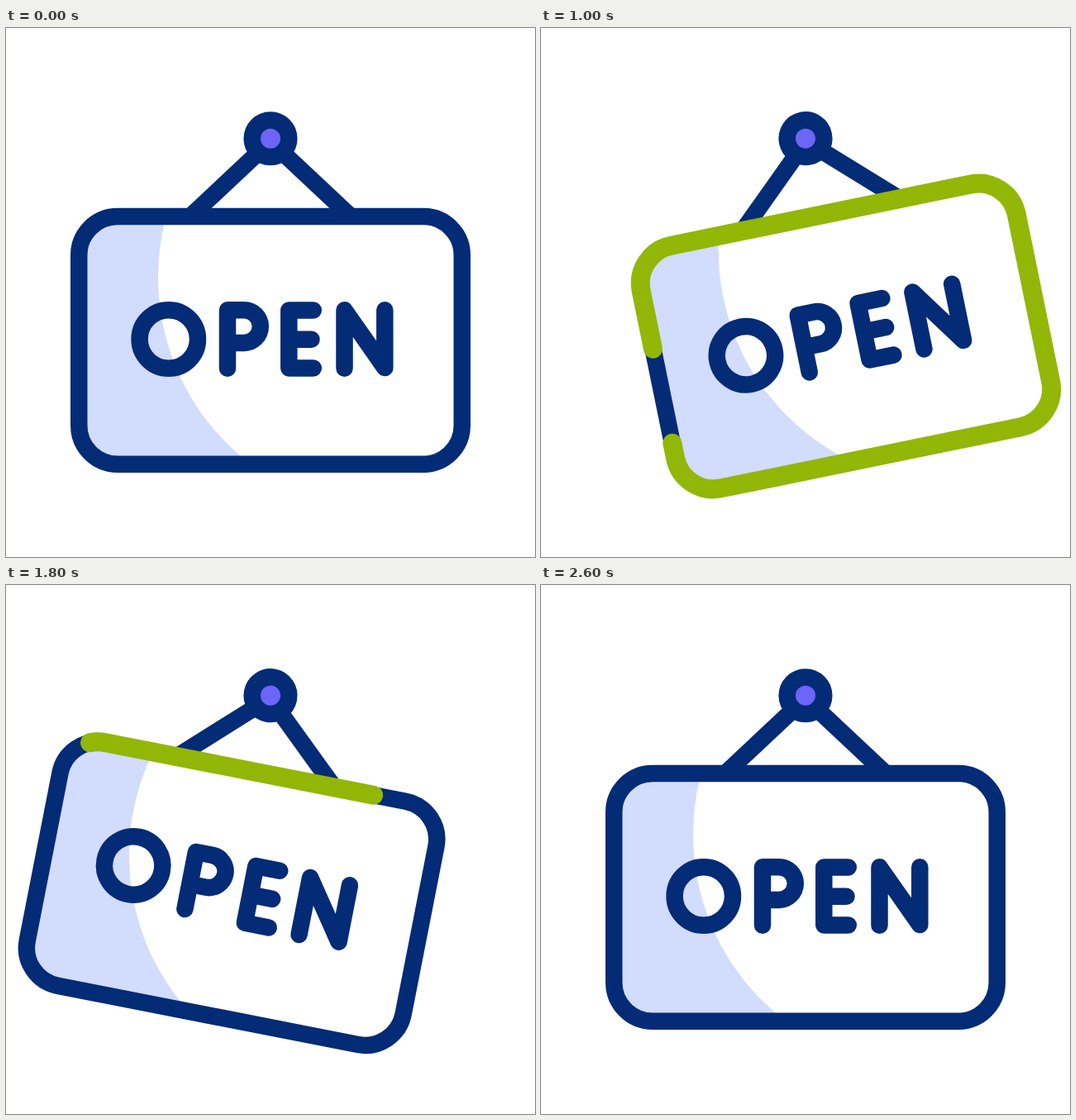
These frames come from a looping animation (640x640 px, 3000 ms). An HTML page:

```html
<!DOCTYPE html>
<html lang="en">
<head>
<meta charset="utf-8">
<title>Open sign</title>
<style>
  html, body { margin: 0; width: 100%; height: 100%; overflow: hidden; background: #fff; }
  svg { display: block; width: 100%; height: 100%; }
  .line { fill: none; stroke: #042b76; stroke-width: 20.5; stroke-linecap: round; stroke-linejoin: round; }
  #glow { stroke: #92b707; stroke-width: 23; }
</style>
</head>
<body>
<svg viewBox="0 0 640 640" role="img" aria-label="Open">
  <defs>
    <path id="board" pathLength="1446" d="M135 228H505A46.75 46.75 0 0 1 551.75 274.75V481A46.75 46.75 0 0 1 505 527.75H135A46.75 46.75 0 0 1 88.25 481V274.75A46.75 46.75 0 0 1 135 228Z"/>
    <clipPath id="inside"><use href="#board"/></clipPath>
  </defs>
  <g id="sign">
    <path class="line" d="M304 152L223.5 227.5M336 152L416.5 227.5"/>
    <g clip-path="url(#inside)">
      <rect x="88" y="228" width="464" height="300" fill="#d2dcfd"/>
      <circle cx="467" cy="302" r="283" fill="#fff"/>
      <rect x="467" y="228" width="90" height="300" fill="#fff"/>
      <g id="word"></g>
    </g>
    <use class="line" href="#board"/>
    <path class="line" id="glow" pathLength="1446"/>
    <circle class="line" cx="320" cy="133.7" r="22.3" style="fill:#6d64f8"/>
  </g>
</svg>
<script>
const LOOP = 3000, STEP = 40, LAP = 1446, DROP = 310;
const $ = id => document.getElementById(id);
const clamp = p => Math.min(1, Math.max(0, p));
const phase = (t, from, to) => clamp((t - from) / (to - from));
const quart = p => p < .5 ? 8 * p ** 4 : 1 - 8 * (1 - p) ** 4;

// Ease with flat ends; a and b are the x values of the curve handles.
function ease(p, a, b) {
  if (p <= 0 || p >= 1) return clamp(p);
  let lo = 0, hi = 1, s;
  for (let i = 0; i < 30; i++) {
    s = (lo + hi) / 2;
    const x = 3 * a * s * (1 - s) ** 2 + 3 * b * s * s * (1 - s) + s ** 3;
    if (x < p) lo = s; else hi = s;
  }
  return s * s * (3 - 2 * s);
}

const glyphs = [
  'M161.6 376.5a35.2 35.2 0 1 1 70.4 0a35.2 35.2 0 1 1 -70.4 0Z',
  'M268 411.7V341.3H288a19.8 19.8 0 0 1 0 39.6H268',
  'M371.8 341.6H342.3V411.6H371.8M342.3 376.8H369.5',
  'M409.5 411.7V341.3L458.3 411V341.3'
];

function addPath(parent, d) {
  const el = document.createElementNS('http://www.w3.org/2000/svg', 'path');
  el.setAttribute('d', d);
  el.setAttribute('class', 'line');
  parent.appendChild(el);
  return el;
}

const letters = glyphs.map(d => [addPath($('word'), d), addPath($('word'), d)]);
$('glow').setAttribute('d', $('board').getAttribute('d'));

function swing(t) {
  if (t < 850) return -12.1 * ease(phase(t, 0, 850), .82, .385);
  if (t < 1690) return -12.1 + 23.5 * ease(phase(t, 850, 1690), .77, .244);
  return 11.4 * (1 - ease(phase(t, 1690, 2600), .463, .278));
}

function roll(t, i) {
  const from = t < 1400 ? 52 + 43 * i : 1574 + 36 * i;
  return DROP * quart(phase(t, from, from + 920));
}

function drawGlow(t) {
  const trim = from => LAP * ease(phase(t, from, from + 1470), .728, .175);
  const head = trim(0), tail = trim(1000), len = head - tail;
  const turn = .6 * t + 40 * Math.sin(Math.PI * phase(t, 480, 2220));
  const start = (669 + turn + tail) % LAP;
  const glow = $('glow');
  glow.style.display = len > .1 ? '' : 'none';
  glow.setAttribute('stroke-dasharray', len + ' ' + (LAP - len));
  glow.setAttribute('stroke-dashoffset', -start);
}

function draw(t) {
  $('sign').setAttribute('transform', `rotate(${swing(t)} 320 133.7)`);
  letters.forEach(([out, next], i) => {
    const y = roll(t, i);
    out.setAttribute('transform', `translate(0 ${-y})`);
    next.setAttribute('transform', `translate(0 ${DROP - y})`);
  });
  drawGlow(t);
}

const begin = performance.now();
function tick() {
  const t = (performance.now() - begin) % LOOP;
  draw(Math.min(2600, Math.floor(t / STEP) * STEP));
  requestAnimationFrame(tick);
}
tick();
</script>
</body>
</html>
```
